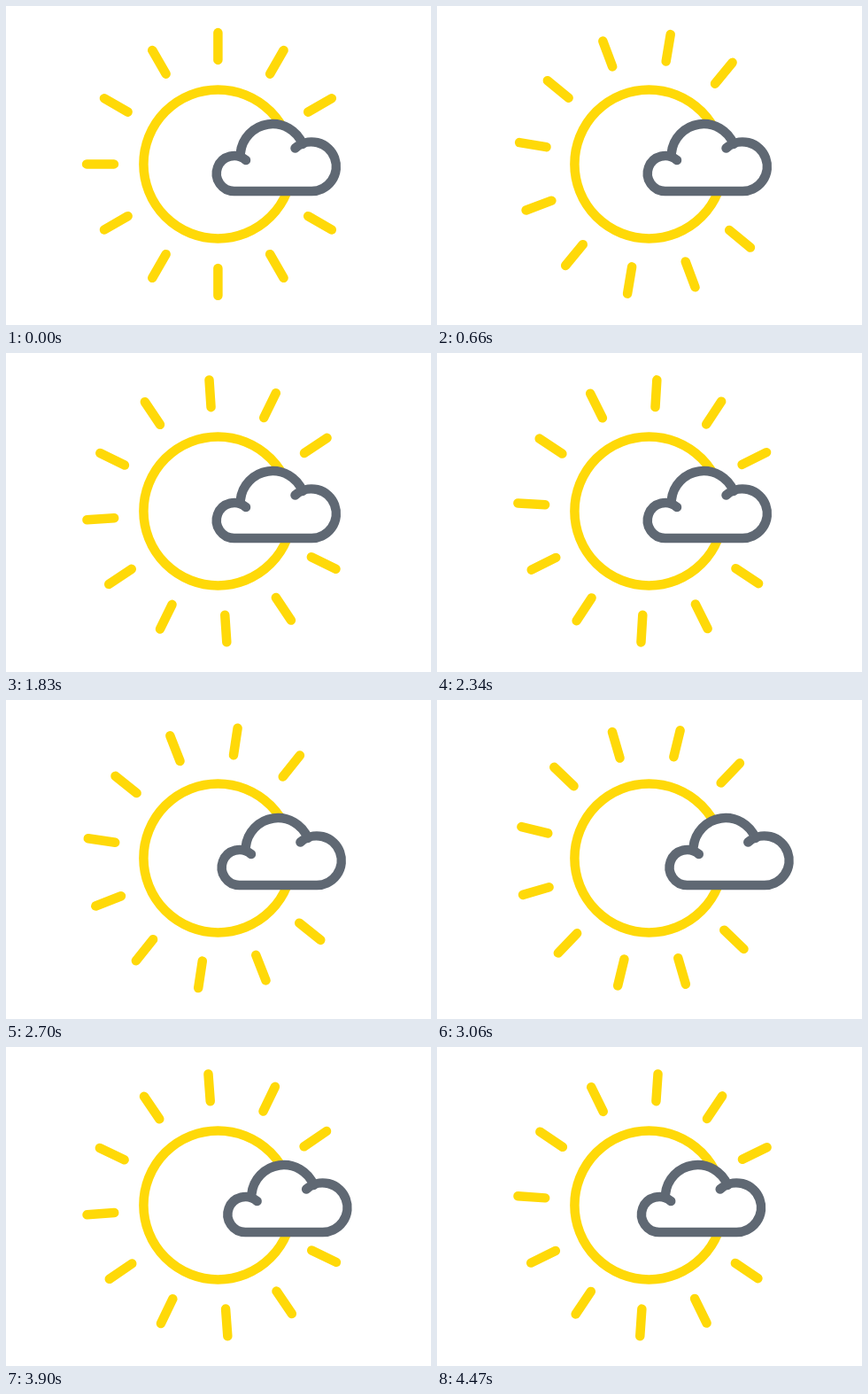
An HTML page that plays this animation: 480 by 360 pixels, repeating every 4.5 s.

```html
<!DOCTYPE html>
<html lang="en">
<head>
<meta charset="utf-8">
<title>Sun and cloud</title>
<style>
  html, body { margin: 0; width: 100%; height: 100%; overflow: hidden; background: #fff; }
  svg { display: block; width: 100vw; height: 100vh; }
  .sun { fill: none; stroke: #ffd908; stroke-width: 10.5; stroke-linecap: round; }
  .outline { fill: none; stroke: #5f6873; stroke-width: 10.5; stroke-linecap: round; }
</style>
</head>
<body>
<svg viewBox="0 0 480 360">
  <g class="sun" transform="translate(239.4 178.4)">
    <circle r="84"/>
    <g id="rays"></g>
  </g>
  <g id="cloud">
    <path fill="#fff" d="M258 209A20 20 0 1 1 265 168A36.5 36.5 0 0 1 335 156A27.8 27.8 0 1 1 344.5 209Z"/>
    <path class="outline" d="M264.8 166A36.5 36.5 0 0 1 335 156M271 174A20 20 0 1 0 258 209H344.5A27.8 27.8 0 1 0 326.5 160.5"/>
  </g>
</svg>
<script>
  const LOOP = 4500, STEP = 30, DEG_PER_MS = 0.0143;
  const cloud = document.getElementById('cloud');
  const rays = Array.from({ length: 12 }, () => {
    const ray = document.createElementNS('http://www.w3.org/2000/svg', 'path');
    ray.setAttribute('d', 'M0-148.3V-117.5');
    return document.getElementById('rays').appendChild(ray);
  });

  const ramp = (x, from, to) => Math.min(1, Math.max(0, (x - from) / (to - from)));
  const ease = (x, from, to) => {
    const u = ramp(x, from, to);
    return u * u * (3 - 2 * u);
  };

  function draw(t) {
    rays.forEach((ray, i) => {
      const angle = (i * 30 + t * DEG_PER_MS) % 360;
      ray.setAttribute('transform', `rotate(${angle})`);
      // Rays vanish while they pass the cloud side
      ray.setAttribute('opacity', 1 - ramp(angle, 64.5, 66.5) + ramp(angle, 111, 113));
    });
    const shift = 28.5 * ease(t, 2480, 3230) - 35.3 * ease(t, 3550, 4300);
    cloud.setAttribute('transform', `translate(${shift})`);
  }

  const start = performance.now();
  function tick() {
    const t = (performance.now() - start) % LOOP;
    draw(Math.floor(t / STEP) * STEP);
    requestAnimationFrame(tick);
  }
  tick();
</script>
</body>
</html>
```
